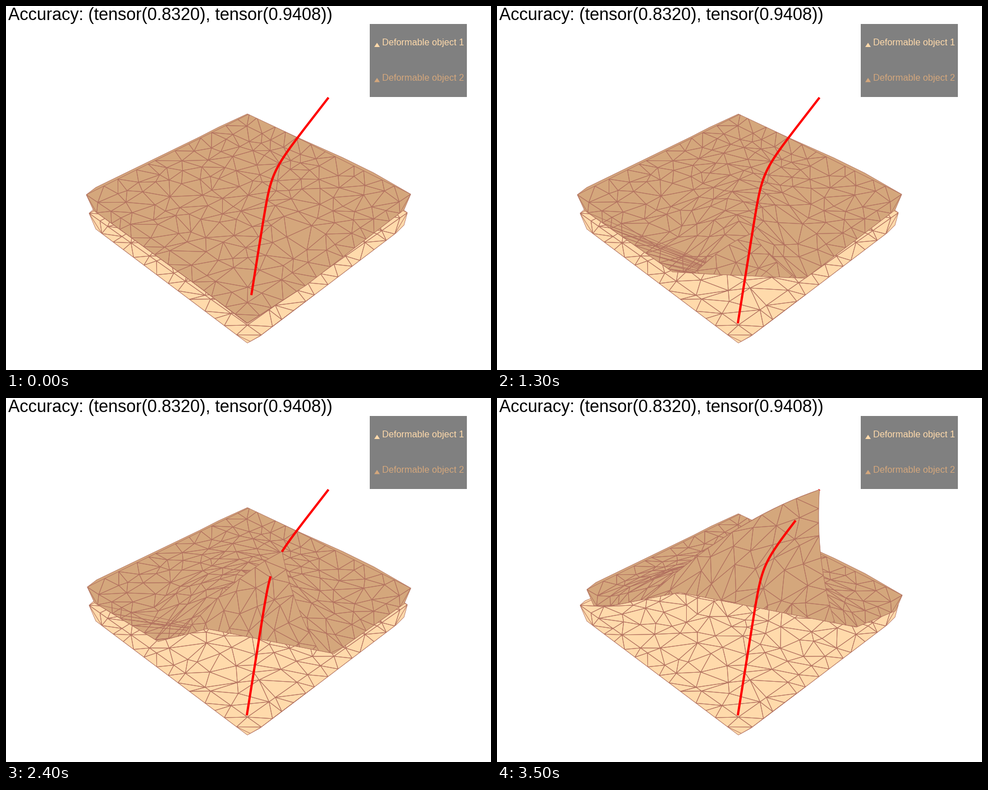
A matplotlib script for the animation above (3.6 s loop, 864 by 648 pixels).

```python
import numpy as np
import matplotlib.pyplot as plt
from matplotlib.animation import FuncAnimation
from matplotlib.collections import PolyCollection
from matplotlib.patches import Polygon, Rectangle
from matplotlib.tri import Triangulation

FRAMES, STEP = 36, 100
LOWER, UPPER, EDGE = "#ffdaab", "#d4a77c", "#b37260"

# Key points of the outlines, left to right.
BACK = np.array([(143, 336), (160, 323), (345, 233), (378, 216), (430, 192),
                 (517, 233), (600, 270), (655, 297), (721, 335)], float)
BASE_RIM = np.array([(148, 369), (160, 397), (430, 600), (452, 588),
                     (550, 514), (695, 404), (709, 390), (715, 368)], float)
BASE_TOP = [(704, 360), (430, 250), (157, 361)]


def lerp(a, b, u):
    return np.asarray(a, float) * (1 - u) + np.asarray(b, float) * u


def curve(pts, x):
    return np.interp(x, *np.asarray(pts).T)


# The pulling path: two straight runs joined by a soft bend.
path_y = np.linspace(163, 565, 600)
path_x = (429 + 0.16 * (565 - path_y)
          + 0.617 * 18 * np.log1p(np.exp((294.6 - path_y) / 18)))
arc = np.r_[0, np.cumsum(np.hypot(np.diff(path_x), np.diff(path_y)))]
arc /= arc[-1]


def tip_at(p):
    """The held corner climbs the path at constant speed."""
    return np.array([np.interp(1 - p, arc, path_x), np.interp(1 - p, arc, path_y)])


def drag(x, p):
    """Late slide of the whole sheet, blended from its left, back and right corners."""
    ends = np.array([(17, 5), (0, 14), (1, 16)]) * np.array([[p ** 6], [p ** 4], [p ** 4]])
    return np.column_stack([np.interp(x, [143, 430, 721], e) for e in ends.T])


def front_rim(p):
    """Lower edge of the sheet: corners, two feet of the fold, and its crest."""
    sides = np.array([(143, 336), (156, 364), (709, 363), (721, 335)], float)
    sides += drag(sides[:, 0], p)
    left = lerp((330, 490), (205, 370), p ** 2)
    right = lerp((535, 497), (640, 408), p ** 2)
    crest = (430 - 105 * p, 565 - 219 * p ** 0.93)
    return np.vstack([sides[:2], left, crest, right, sides[2:]])


def jitter_grid(n, seed):
    rng = np.random.default_rng(seed)
    a, b = (g.ravel() for g in np.meshgrid(*[np.linspace(0, 1, n)] * 2))
    amount = 0.36 / (n - 1)
    return [g + rng.uniform(-amount, amount, g.size) * ((g > 0) & (g < 1))
            for g in (a, b)]


def project(corners, a, b):
    """Perspective image of the unit square (front, left, right, back)."""
    front, left, right, back = np.array(corners, float)
    w = (front[1] - back[1]) / (left[1] + right[1] - 2 * back[1])
    a, b = a[:, None], b[:, None]
    return (front * (1 - a - b) + w * (a * left + b * right)) / (1 + (a + b) * (w - 1))


def slab_mesh(corners, rim, n, seed):
    top = project(corners, *jitter_grid(n, seed))
    x = np.linspace(rim[0, 0], rim[-1, 0], 2 * n + 3)[1:-1]
    x = x + np.random.default_rng(seed + 1).uniform(-4, 4, x.size)
    pts = np.vstack([top, np.column_stack([x, curve(rim, x)])])
    return pts, Triangulation(pts[:, 0], 1.6 * pts[:, 1]).triangles


REST = front_rim(0)
base_pts, base_tri = slab_mesh([(430, 568), (148, 369), (715, 368), (430, 236)],
                               BASE_RIM, 13, 4)
sheet_pts, sheet_tri = slab_mesh([(430, 528), (143, 336), (721, 335), (430, 192)],
                                 REST, 13, 11)
flap_a, flap_b = jitter_grid(14, 23)
flap_h = flap_a + flap_b
flap_q = np.where(flap_h > 0, flap_b / np.maximum(flap_h, 1e-9), 0.5)[:, None]
flap_tri = Triangulation(flap_a, flap_b).triangles

fig = plt.figure(figsize=(12, 9), dpi=72, facecolor="white")
ax = fig.add_axes([0, 0, 1, 1])
ax.set(xlim=(0, 864), ylim=(648, 0))
ax.axis("off")


def layer(color, z):
    skin = ax.add_patch(Polygon([(0, 0), (1, 0), (0, 1)], facecolor=color,
                                edgecolor=EDGE, lw=0.8, joinstyle="round", zorder=z))
    wires = PolyCollection([], facecolors="none", edgecolors=EDGE,
                           linewidths=0.95, zorder=z + 0.1)
    ax.add_collection(wires, autolim=False)
    return skin, wires


def shape(parts, outline, triangles):
    skin, wires = parts
    skin.set_xy(outline)
    wires.set_verts(triangles)
    wires.set_clip_path(skin)


base, sheet, flap = layer(LOWER, 1), layer(UPPER, 2), layer(UPPER, 3)
shape(base, np.vstack([BASE_RIM, BASE_TOP]), base_pts[base_tri])
strands = [ax.plot([], [], color="red", lw=4, solid_capstyle="butt",
                   solid_joinstyle="round", zorder=4)[0] for _ in range(2)]

ax.text(4, 25, "Accuracy: (tensor(0.8320), tensor(0.9408))",
        family="Liberation Sans", size=30.5, va="baseline", zorder=6)
ax.add_patch(Rectangle((648, 32), 173, 130, color="#808080", lw=0, zorder=5))
for num, (y, color) in enumerate([(70, LOWER), (132.5, UPPER)], 1):
    ax.add_patch(Polygon([(656, y + 3), (661, y - 4.5), (666, y + 3)],
                         color=color, lw=0, zorder=6))
    ax.text(669.5, y, f"Deformable object {num}", family="Liberation Sans",
            size=16.2, color=color, va="baseline", zorder=6)


def draw_sheet(p, rim):
    """Shift each column of the mesh so that it fits between the back and front rims."""
    x, y = sheet_pts.T
    high, low = curve(BACK, x), curve(REST, x)
    f = np.clip((y - high) / np.maximum(low - high, 1), 0, 1)
    w = f * f * (3 - 2 * f)
    dx, dy = drag(x, p).T
    pts = np.column_stack([x + dx, y + (1 - w) * dy + w * (curve(rim, x + dx) - low)])
    back = BACK + drag(BACK[:, 0], p)
    shape(sheet, np.vstack([back[1:-1], rim[::-1]]), pts[sheet_tri])


def draw_flap(p, rim, tip):
    """Underside of the lifted corner: a three-sided patch ending at the tip."""
    def edge(foot, bend, s):
        s = s[:, None]
        mid = lerp(foot, tip, 0.5) + np.multiply(bend, p)
        return (1 - s) ** 2 * foot + 2 * s * (1 - s) * mid + s ** 2 * tip

    foot_l, crest, foot_r = rim[2:5]
    foot_l, foot_r = lerp(foot_l, crest, 0.5), lerp(foot_r, crest, 0.12)
    bend_l, bend_r = (0, -45), (-22, 8)

    s = np.linspace(0, 1, 20)
    ground = np.linspace(foot_r[0], foot_l[0], 80)
    outline = np.vstack([edge(foot_l, bend_l, s), edge(foot_r, bend_r, s[::-1]),
                         np.column_stack([ground, curve(rim, ground)])])

    reach = 0.03 + 0.6 * p ** 0.7
    s = np.maximum(1 - flap_h / reach, -0.25)
    pts = lerp(edge(foot_l, bend_l, s), edge(foot_r, bend_r, s), flap_q)
    foot = lerp(foot_l, foot_r, flap_q)
    pts[:, 1] += (1 - s) * (curve(rim, foot[:, 0]) - foot[:, 1])
    shown = flap_h[flap_tri].max(axis=1) < reach * 1.25
    shape(flap, outline, pts[flap_tri[shown]])


def draw_path(p, tip_y):
    """The sheet hides the path above the tip early on and below it later."""
    size = np.interp(p, [0, 0.15, 0.26, 0.48, 0.69, 1], [51, 38, 0, 0, 45, 55])
    top, low = (tip_y - size, tip_y) if p < 0.4 else (tip_y, tip_y + size)
    for line, seen in zip(strands, (path_y <= top + 1, path_y >= low)):
        line.set_data(path_x[seen], path_y[seen])


def draw(i):
    p = i / (FRAMES - 1)
    rim, tip = front_rim(p), tip_at(p)
    draw_sheet(p, rim)
    draw_flap(p, rim, tip)
    draw_path(p, tip[1])
    return [*sheet, *flap, *strands]


anim = FuncAnimation(fig, draw, frames=FRAMES, interval=STEP,
                     repeat=True, repeat_delay=0, blit=False)
plt.show()
```
